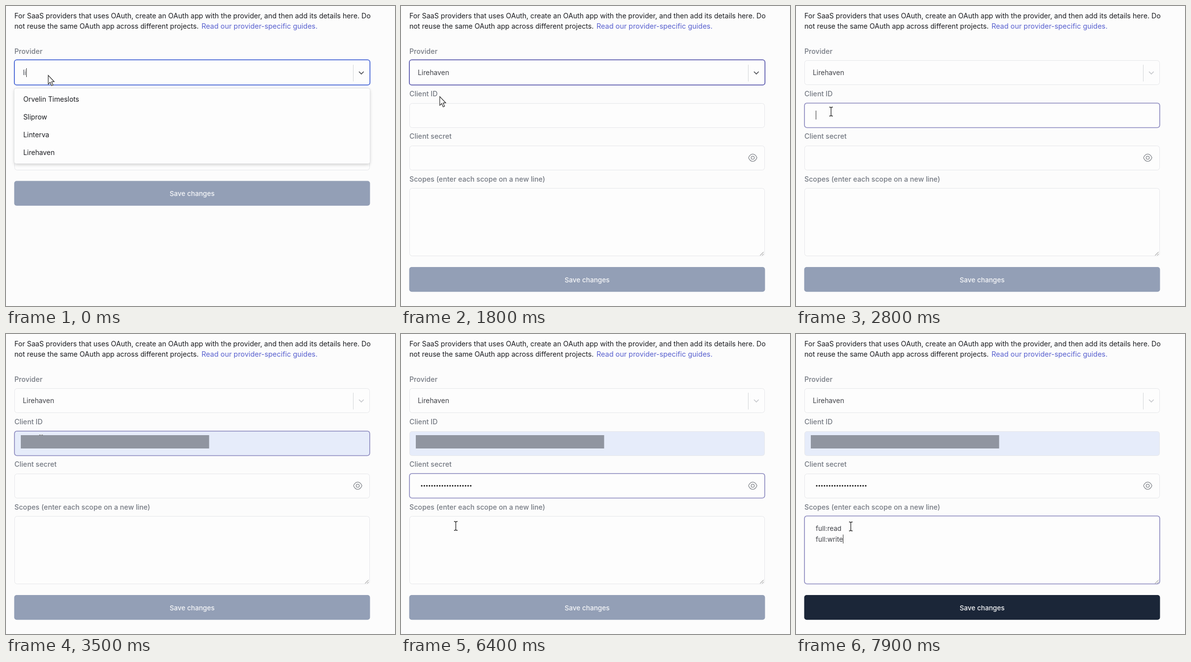
An HTML page with a canvas for the animation above (8 s loop, 788 px wide and 608 px high).

```html
<!DOCTYPE html>
<html lang="en">
<head>
<meta charset="utf-8">
<title>Provider form</title>
<style>
html, body { margin: 0; width: 100%; height: 100%; overflow: hidden; background: #fcfcfc; }
canvas { display: block; }
</style>
</head>
<body>
<canvas id="stage" width="788" height="608"></canvas>
<script>
const ctx = document.getElementById('stage').getContext('2d');
const LOOP = 8000, STEP = 100;
const FAMILY = 'Inter, "Open Sans", sans-serif';
const LEFT = 17, WIDTH = 720;
const INK = '#1b1c20', VALUE = '#404248', LABEL = '#747982', BORDER = '#e6e7ea', FOCUS = '#8b89be';
const CHOICE = 'Lirehaven';
const OPTIONS = ['Orvelin Timeslots', 'Sliprow', 'Linterva', CHOICE];

// Moments of user actions, in ms
const AT = { third: 100, fourth: 300, pick: 1800, id: 2700, idFill: 3100, secret: 4500,
             secretFill: 5300, scopes: 6600, scopesFill: 7500 };

// Pointer stops: time, x, y
const PATH = [
  [0, 85, 140], [500, 85, 140], [1000, 80, 142], [1200, 80, 142], [1300, 80, 160], [1600, 79, 182],
  [1800, 78, 183], [1900, 77, 184], [2600, 71, 214], [3900, 71, 214], [4300, 118, 307],
  [5600, 118, 307], [6400, 111, 389], [6700, 111, 390], [8000, 111, 390]
];

function pointerAt(t) {
  let i = 1;
  while (i < PATH.length - 1 && t > PATH[i][0]) i++;
  const [t0, x0, y0] = PATH[i - 1], [t1, x1, y1] = PATH[i];
  const p = Math.min(1, (t - t0) / (t1 - t0)), e = p * p * (3 - 2 * p);
  return { x: x0 + (x1 - x0) * e, y: y0 + (y1 - y0) * e };
}

function text(s, x, y, color = INK, size = 13.8, weight = 400, align = 'left') {
  ctx.font = `${weight} ${size}px ${FAMILY}`;
  ctx.fillStyle = color;
  ctx.textAlign = align;
  ctx.fillText(s, x, y);
  return x + ctx.measureText(s).width;
}

const label = (s, y) => text(s, LEFT, y, LABEL, 14.2, 500);

function line(color, width, ...points) {
  ctx.strokeStyle = color;
  ctx.lineWidth = width;
  ctx.beginPath();
  points.forEach(([x, y]) => ctx.lineTo(x, y));
  ctx.stroke();
}

function box(x, y, w, h, fill, stroke, width = 1, r = 5) {
  ctx.beginPath();
  ctx.roundRect(x, y, w, h, r);
  ctx.fillStyle = fill;
  ctx.fill();
  if (!stroke) return;
  ctx.strokeStyle = stroke;
  ctx.lineWidth = width;
  ctx.stroke();
}

function field(y, h, focused, fill = '#fdfdfd') {
  if (focused) box(LEFT + .2, y - .3, WIDTH - .4, h - .2, fill, FOCUS, 1.6);
  else box(LEFT + .5, y + .5, WIDTH - 1, h - 1, fill, BORDER);
}

function caret(x, y, since, t, h = 18) {
  if (Math.floor((t - since) / 500) % 2 === 0) line('#333', 1, [x, y - h / 2], [x, y + h / 2]);
}

function eye(x, y) {
  ctx.strokeStyle = '#85888e';
  ctx.lineWidth = 1.3;
  ctx.beginPath();
  ctx.moveTo(x - 8.5, y);
  ctx.bezierCurveTo(x - 4.5, y - 9.8, x + 4.5, y - 9.8, x + 8.5, y);
  ctx.bezierCurveTo(x + 4.5, y + 9.8, x - 4.5, y + 9.8, x - 8.5, y);
  ctx.stroke();
  ctx.beginPath();
  ctx.arc(x, y, 3.2, 0, Math.PI * 2);
  ctx.stroke();
}

function intro() {
  text('For SaaS providers that uses OAuth, create an OAuth app with the provider, and then add its details here. Do', LEFT, 25, INK, 14.15);
  text('not reuse the same OAuth app across different projects.', LEFT, 46, INK, 14.15);
  text('Read our provider-specific guides.', 396, 46, '#5860cf', 14.4);
}

function select(t) {
  const focused = t < AT.id;
  label('Provider', 97);
  if (focused) box(16.9, 109.2, 720.4, 51, '#fdfdfd', t < AT.pick ? '#4a68d6' : '#6261b2', 1.8);
  else field(110, 50, false);
  line('#d4d5d8', 1, [703.5, 119], [703.5, 153]);
  line(focused ? '#4a4c52' : '#c6c8cc', 1.7, [715, 133], [719.8, 137.8], [724.6, 133]);
  if (t >= AT.pick) {
    text(CHOICE, 34, 140, VALUE);
    return;
  }
  const typed = CHOICE.toLowerCase().slice(0, t < AT.third ? 2 : t < AT.fourth ? 3 : 4);
  const end = text(typed, 34, 140, '#55585f');
  caret(Math.round(end) + .5, 135, t < AT.fourth ? 0 : AT.fourth, t);
}

function menu(t) {
  const items = t < AT.third ? OPTIONS : [CHOICE];
  ctx.save();
  ctx.shadowColor = 'rgba(0,0,0,.2)';
  ctx.shadowBlur = 6;
  ctx.shadowOffsetY = 2;
  box(17, 167, 720, 8.5 + 36 * items.length, '#fdfdfd', null, 0, 4);
  ctx.restore();
  box(16.5, 166.5, 721, 9 + 36 * items.length, '#fdfdfd', '#e2e3e5', 1, 4);
  items.forEach((s, i) => text(s, 35, 194 + 36 * i));
}

function clientId(t) {
  const filled = t >= AT.idFill, focused = t >= AT.id && t < AT.secret;
  label('Client ID', 183);
  field(197, 50, focused, filled ? '#e6ecfa' : undefined);
  if (focused && !filled) caret(40.5, 221, AT.id, t);
}

// Cover over the client ID, above everything else
function redaction() {
  ctx.fillStyle = '#9095a0';
  ctx.fillRect(30, 205, 381.5, 27);
}

function clientSecret(t) {
  const filled = t >= AT.secretFill, focused = t >= AT.secret && t < AT.scopes;
  label('Client secret', 269);
  field(283, 50, focused);
  eye(712.5, 307.5);
  if (filled) {
    ctx.fillStyle = '#222';
    for (let i = 0; i < 20; i++) {
      ctx.beginPath();
      ctx.arc(42 + 5.22 * i, 307.7, 1.6, 0, Math.PI * 2);
      ctx.fill();
    }
  }
  if (focused) caret(filled ? 145.5 : 40.5, 307.5, filled ? 5450 : AT.secret + 100, t);
}

function scopes(t) {
  const filled = t >= AT.scopesFill, focused = t >= AT.scopes;
  label('Scopes (enter each scope on a new line)', 356);
  field(369, 138, focused);
  line('#777', 1, [727.5, 505.5], [734.5, 498.5]);
  line('#777', 1, [731.5, 505.5], [734.5, 502.5]);
  if (filled) {
    text('full:read', 40, 399, VALUE, 13.5);
    const end = text('full:write', 40, 420.5, VALUE, 13.5);
    caret(Math.round(end) + .5, 415.5, AT.scopesFill, t);
  } else if (focused) caret(40.5, 394, AT.scopes, t);
}

function button(t) {
  const y = t < AT.pick ? 354.5 : 529;
  const fill = t < AT.scopesFill ? '#939fb6' : t < AT.scopesFill + 100 ? '#566179' : '#1b2638';
  box(LEFT - .4, y, WIDTH + .8, 50.3, fill);
  text('Save changes', 377, y + 30.5, '#f6f7f9', 13.6, 500, 'center');
}

function pointer(t) {
  const { x, y } = pointerAt(t);
  const inField = (top, h) => y >= top && y <= top + h;
  const beam = t >= AT.pick && (inField(197, 50) || inField(283, 50) || inField(369, 138));
  ctx.save();
  ctx.translate(Math.round(x), Math.round(y));
  if (beam) {
    for (const [color, w] of [['#fff', 3], ['#222', 1.3]]) {
      line(color, w, [0, -8], [0, 8]);
      for (const s of [-1, 1]) line(color, w, [-3.5, 9 * s], [-1.5, 9 * s], [0, 7.8 * s], [1.5, 9 * s], [3.5, 9 * s]);
    }
  } else {
    if (t >= 1300 && t < 1400) ctx.globalAlpha = .6;
    ctx.scale(1.05, 1.05);
    ctx.beginPath();
    [[.5, .5], [.5, 17.5], [4.2, 14], [7, 20.5], [9.8, 19.3], [7, 13], [12, 12.6]].forEach(p => ctx.lineTo(...p));
    ctx.closePath();
    ctx.fillStyle = '#fff';
    ctx.fill();
    ctx.strokeStyle = '#333';
    ctx.lineWidth = 1.2;
    ctx.stroke();
  }
  ctx.restore();
}

function draw(t) {
  ctx.fillStyle = '#fcfcfc';
  ctx.fillRect(0, 0, 788, 608);
  intro();
  clientId(t);
  clientSecret(t);
  if (t >= AT.pick) scopes(t);
  button(t);
  select(t);
  if (t < AT.pick) menu(t);
  pointer(t);
  if (t >= AT.idFill) redaction();
}

const start = performance.now();
function tick() {
  const t = (performance.now() - start) % LOOP;
  draw(Math.floor(t / STEP) * STEP);
  requestAnimationFrame(tick);
}
tick();
</script>
</body>
</html>
```
